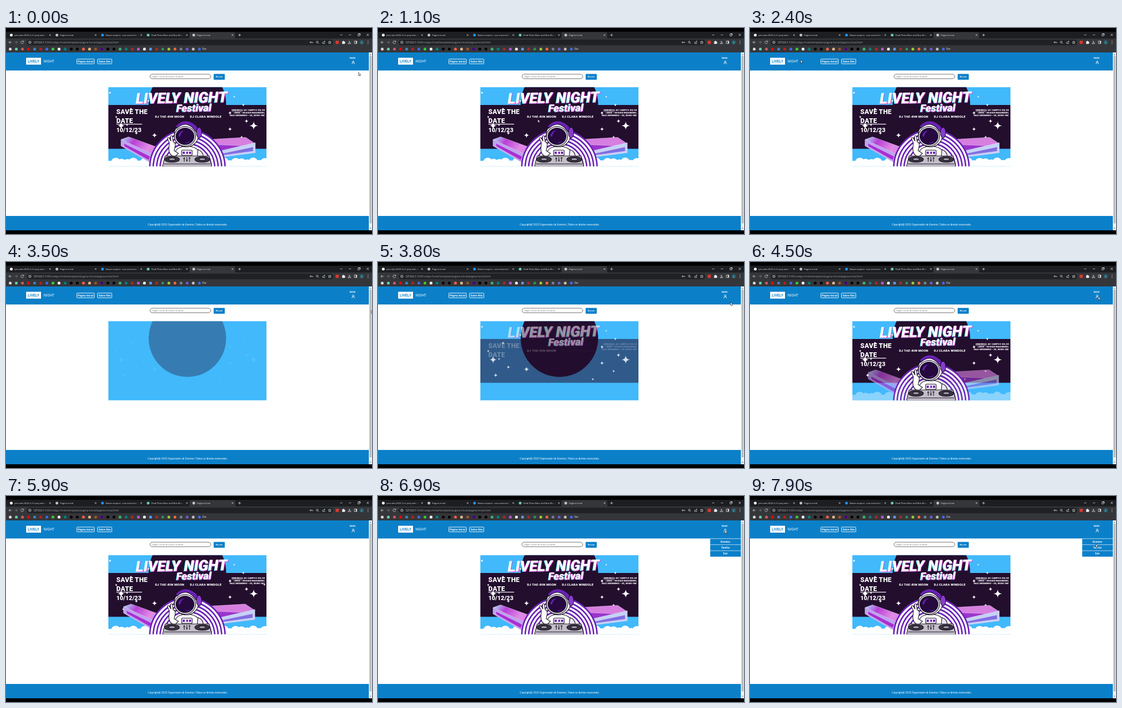
Recreate the animation shown at these times as an HTML page. Size 690 by 388 pixels, loop 8 s.

```html
<!DOCTYPE html>
<html lang="pt">
<head>
<meta charset="utf-8">
<title>Pagina inicial</title>
<style>
html, body { margin: 0; height: 100%; overflow: hidden; background: #000; }
svg { display: block; width: 100vw; height: 100vh; font-family: "Liberation Sans", Arial, sans-serif; }
.ui { font-family: "Open Sans", sans-serif; fill: #e8eaed; }
.b { font-weight: 700; fill: #fff; font-size: 4.65px; }
.m { text-anchor: middle; }
.fat { font-family: Roboto, sans-serif; font-weight: 900; fill: #fff; }
.i { font-style: italic; }
.ln { fill: none; stroke: #dcdee2; stroke-width: .8; }
.wl { fill: none; stroke: #fff; stroke-width: .9; }
.ink { stroke: #17101f; stroke-width: 1.1; }
</style>
</head>
<body>
<svg viewBox="0 0 690 388" preserveAspectRatio="none">
<defs>
  <clipPath id="frame"><rect x="193" y="111.5" width="298" height="149"/></clipPath>
  <linearGradient id="gem" x2="1" y2=".4">
    <stop offset="0" stop-color="#a8eaf7"/><stop offset=".3" stop-color="#b93fd6"/>
    <stop offset=".65" stop-color="#e08ae6"/><stop offset="1" stop-color="#d77be6"/>
  </linearGradient>
  <linearGradient id="fade"><stop offset=".86" stop-color="#e8eaed"/><stop offset="1" stop-color="#e8eaed" stop-opacity="0"/></linearGradient>
</defs>

<!-- browser -->
<rect y="7" width="690" height="13" fill="#1d1e21"/>
<path d="M344 20q2 0 2-2v-8q0-2 2-2h82q2 0 2 2v8q0 2 2 2z" fill="#35363a"/>
<rect y="19.7" width="690" height="26.5" fill="#35363a"/>
<rect x="39" y="22" width="578" height="10.4" rx="5.2" fill="#202124"/>
<g id="tabs" class="ui" font-size="4.15"></g>
<g class="ln">
  <path d="M437.7 13.3h5.2m-2.6-2.6v5.2M630 12l2 2 2-2M646.5 13h4M663.5 11.5h3.4v3.4h-3.4zm1-1h3.4v3.4M680 10.9l4 4m0-4l-4 4"/>
  <path d="M10.6 27H5.5m2.4-2.4L5.5 27l2.4 2.4"/>
  <path d="M16.5 27h5m-2.4-2.4l2.4 2.4-2.4 2.4" stroke="#85878b"/>
  <path d="M32.6 25.4a2.5 2.5 0 1 0 .5 2.2M33.3 23.9v2h-2"/>
  <circle cx="45" cy="27" r="2.3"/><path d="M45 26.5v1.7m0-2.8v.5"/>
  <circle cx="574.3" cy="27" r="1.2"/><path d="M575.5 27h3v1.3"/>
  <circle cx="586.7" cy="26.5" r="1.7"/><path d="M588 27.8l1.7 1.7"/>
  <path d="M597 26v3.2h4V27.5M598.5 27.2q.4-2 2.6-2m-1.1-1.1l1.3 1.1-1.3 1.2"/>
  <path d="M610.4 24.3l.8 1.8 2 .2-1.5 1.3.4 2-1.7-1-1.7 1 .4-2-1.5-1.3 2-.2z"/>
  <path d="M647.5 24v3.8m-1.8-1.7l1.8 1.8 1.8-1.8M645 28v1.5h5V28"/>
  <rect x="656.7" y="24.6" width="4.6" height="4.6"/><path d="M660.4 24.6v4.6" stroke-width="1.8"/>
</g>
<rect x="621.5" y="24" width="6" height="6" rx="1" fill="#d8392d"/>
<path d="M633.7 25.2h1.5q0-1.3 1-1.3t1 1.3h1.5v1.5q1.2 0 1.2 1t-1.2 1v1.2h-5z" fill="#e8eaed"/>
<circle cx="670.7" cy="27" r="3.7" fill="#2d6577"/>
<text class="ui m" x="670.7" y="28.5" font-size="4">J</text>
<path d="M682.5 24.4v.1m0 2.4v.1m0 2.4v.1" stroke="#e8eaed" stroke-width="1.2" stroke-linecap="round"/>
<text class="ui" x="51.5" y="28.7" font-size="4.82">127.0.0.1<tspan fill="#9aa0a6">:5500/codigo-fonte/templates/pagina-inicial/pagina-inicial.html</tspan></text>
<g id="marks"></g>
<text class="ui" x="370" y="41.4" font-size="4.4">Dev</text>

<!-- page -->
<rect y="46" width="690" height="335" fill="#fff"/>
<rect y="46" width="684" height="34" fill="#0b80c9"/>
<rect y="354" width="684" height="27" fill="#0b80c9"/>
<rect x="684" y="46" width="6" height="335" fill="#f1f1f1"/>
<rect x="685.3" y="52" width="3.8" height="316" fill="#bcbcbc"/>
<path d="M685.7 50.3l1.5-1.8 1.5 1.8zM685.7 376.5l1.5 1.8 1.5-1.8z" fill="#606060"/>
<rect x="38" y="56" width="28" height="13" fill="#fff"/>
<text class="m" x="52" y="64.7" font-size="6.4" font-weight="700" fill="#0b80c9">LIVELY</text>
<text class="m" x="81" y="64.7" font-size="6.4" fill="#fff">NIGHT</text>
<g class="wl"><rect x="133.5" y="58.5" width="33" height="9" rx=".8"/><rect x="172.5" y="58.5" width="27" height="9" rx=".8"/>
  <circle cx="654.6" cy="63.6" r="1.5"/><path d="M652.1 68.2q0-3 2.5-3t2.5 3"/></g>
<g class="m">
  <text class="b" x="150" y="64.7">Página Inicial</text>
  <text class="b" x="186" y="64.7">Sobre Nós</text>
  <text class="b" x="653.3" y="58">teste</text>
  <text x="342" y="372.4" font-size="4.62" fill="#fff">Copyright@ 2023 Organizador de Eventos | Todos os direitos reservados</text>
</g>
<rect x="271.5" y="87" width="114.5" height="8.6" rx="4.3" fill="#fff" stroke="#4a4a4a" stroke-width=".8"/>
<text x="276" y="92.6" font-size="3.85" fill="#6d6d6d">Digite o nome do evento ou tarefa</text>
<rect x="391.5" y="86.5" width="21" height="11" rx="1" fill="#0b80c9"/>
<text class="b m" x="402" y="93.4" style="font-size:3.8px">Buscar</text>

<!-- banner -->
<g clip-path="url(#frame)">
  <rect x="193" y="111" width="298" height="150" fill="#41b9fb"/>
  <circle id="disc" cx="342" cy="143.5" r="73" fill="#230e2e"/>
  <rect id="band" x="193" y="145" width="298" height="82.5" fill="#230e2e"/>
  <g id="stars" fill="#fff"></g>
  <g id="clouds" fill="#fff"></g>
  <g id="gems" stroke="#f3c9f7" stroke-width=".5">
    <g id="gemL">
      <path d="M217 210l14-5 72 26-8 20-24 2-54-31z" fill="url(#gem)"/>
      <path d="M217 210l60 28-6 15-54-31z" fill="#b9a4ef"/>
      <path d="M222 217l50 25-3 7-46-26z" fill="#a92fd0"/>
    </g>
    <g id="gemR">
      <path d="M364 211l88-5 18 12-86 22z" fill="#d67fdf"/>
      <path d="M364 211l20 29 70-18-76-3z" fill="#9a35cc"/>
      <path d="M384 236l86-20v19l-86 11z" fill="#c3d3f5"/>
      <path d="M386 241l80-17v8l-80 11z" fill="#7f6fe0"/>
    </g>
  </g>
  <g id="arcs" fill="#fff" stroke="#6a22b5" stroke-width="2.8"></g>
  <g id="dj">
    <path d="M318 240q0-17 23-17t25 17v8h-48z" fill="#fff" class="ink"/>
    <path d="M318 243q-11-3-11-15l1-12-4-8q1-3 4 0l3 5-1-9q2-3 4 1l1 9q5 2 4 8l-2 9 8 5z" fill="#fff" class="ink"/>
    <path d="M362 229q11 4 10 16h-12z" fill="#eee6f5" class="ink"/>
    <circle cx="340" cy="201" r="23" fill="#fff" class="ink"/>
    <path d="M320 184q18-18 39 0l5 9-6 3q-16-25-36-7z" fill="#6a22b5" class="ink"/>
    <ellipse cx="364" cy="197" rx="5" ry="10" fill="#8a3bd0" class="ink"/>
    <ellipse cx="337.5" cy="204" rx="20" ry="18.5" fill="#dcd4e4" class="ink"/>
    <ellipse cx="337.5" cy="204" rx="17" ry="15.5" fill="#25093f" class="ink"/>
    <path d="M325 203q2-9 11-10-7 4-8 12zM348 213q-5 5-11 4 7-2 11-4z" fill="#6a22b5"/>
    <rect x="331" y="230" width="20" height="10" rx="2" fill="#eee6f5" class="ink"/>
    <path d="M333 233h4v4h-4zm7 0h3v4h-3zm5 0h4v4h-4z" fill="#6a22b5"/>
    <path d="M300 241h83l5 20h-93z" fill="#c3bfc9" class="ink"/>
    <g id="decks" class="ink"></g>
    <path d="M336 243v9m5-9v9m5-9v9M334 246h4m1 3h4m1-4h4M298 256h87" class="ink" fill="none"/>
  </g>
  <g id="title" class="fat i" transform="rotate(-1 331 140)"></g>
  <g class="fat" font-size="12.4">
    <g id="save"><text x="208" y="162" letter-spacing=".25">SAVE THE</text></g>
    <g id="date"><text x="208" y="178.5" letter-spacing=".3">DATE</text></g>
    <g id="day"><path d="M208 181.2h48.5" stroke="#fff" stroke-width="1.2"/><text x="208" y="195.8" font-size="11.3">10/12/23</text></g>
  </g>
  <g class="fat m" font-size="6.1" letter-spacing=".2">
    <text id="dj1" x="308.5" y="169.3">DJ TAE-RIN MOON</text>
    <text id="dj2" x="376.5" y="169.3">DJ CLARA WINDOLE</text>
  </g>
  <g id="place" class="fat" font-size="4.1" text-anchor="end">
    <path d="M425 157h21" stroke="#fff" stroke-width=".5"/>
    <text x="488" y="156.2">ENDEREÇO: AV. CAMPO E SOL DE</text>
    <text x="488" y="161.3">LINHO – BOSQUE IMAGINÁRIO,</text>
    <text x="487.5" y="166.4">VALE SERENINHO – XX, 00000-000</text>
  </g>
</g>

<g id="menu" class="m">
  <rect x="626.3" y="80" width="57.7" height="34.3" fill="#0b80c9"/>
  <path d="M626.3 80.3h57.7m-57.7 11.4h57.7m-57.7 11.4h57.7" stroke="#fff" stroke-width=".7"/>
  <text class="b" x="655" y="87.5">Eventos</text>
  <text class="b" x="655" y="99">Tarefas</text>
  <text class="b" x="655" y="110.4">Sair</text>
</g>
<path id="cursor" d="M0 0v6l1.4-1.3 1 2.2.9-.4-1-2.1h2z" fill="#fff" stroke="#111" stroke-width=".6"/>
</svg>
<script>
const $ = id => document.getElementById(id);
const clamp = v => Math.max(0, Math.min(1, v));
const fill = (id, list, draw) => $(id).innerHTML = list.map(draw).join('');
const range = n => [...Array(n).keys()];

fill('tabs', [
  ['white', 'pmv-ads-2023-2-e1-proj-web-m'],
  ['silver', 'Pagina inicial'],
  ['dodgerblue', 'Baixar arquivo - sua conversão f'],
  ['mediumaquamarine', 'Draft Plans Base and Non-Base'],
  ['silver', 'Pagina inicial']
], ([color, name], i) => {
  const x = 10 + 86 * i;
  return `<circle cx="${x}" cy="13.3" r="2.6" fill="${color}"/>
    <text x="${x + 6}" y="14.8" ${name.length > 20 ? 'fill="url(#fade)"' : ''}>${name}</text>
    <path class="ln" d="M${x + 71.6} 11.9l2.8 2.8m0-2.8l-2.8 2.8"/>`;
});

const markColors = ('gainsboro mediumaquamarine indianred red steelblue firebrick royalblue limegreen white teal black black ' +
  'tomato burlywood sienna indigo black black mediumseagreen teal brown mediumorchid white cornflowerblue ' +
  'brown seagreen yellowgreen tomato slategray slateblue silver royalblue').split(' ');
fill('marks', markColors, (color, i) =>
  `<rect x="${5.5 + 11.5 * i}" y="37.3" width="5" height="5" rx="1.6" fill="${color}"/>`);

// Four-pointed stars: three large ones, the rest scattered over the band
let seed = 11;
const random = () => (seed = seed * 16807 % 2147483647) / 2147483647;
const small = range(14).map(i => [(i % 2 ? 404 : 196) + random() * 84, 122 + i * 7.6, 2 + random() * 2.5]);
fill('stars', [[217, 184, 7], [467, 184, 8], [280, 202, 5], ...small], ([x, y, r]) =>
  `<path transform="translate(${x} ${y}) scale(${r})" d="M0-1Q.06-.06 1 0Q.06.06 0 1Q-.06.06-1 0Q-.06-.06 0-1"/>`);

fill('clouds', range(16), i => {
  const k = i >> 1, x = 196 + 11 * k;
  return `<circle cx="${i % 2 ? 684 - x : x}" cy="${259 - 6 * Math.abs(Math.sin(k * 1.9 + i % 2))}" r="9"/>`;
});

fill('arcs', range(5), i => `<circle cx="342" cy="263" r="${71 - 6.5 * i}"/>`);

fill('decks', [313, 370], x => `<ellipse cx="${x}" cy="247.5" rx="14" ry="5.5" fill="#3a3342"/>
  <ellipse cx="${x}" cy="247" rx="6" ry="2.4" fill="#aaa4b2"/>`);

fill('title', [['#35e6ee', -1], ['#e23bd0', 1], ['#fff', 0]], ([color, d]) =>
  `<g transform="translate(${d} ${Math.abs(d)})" fill="${color}" text-anchor="middle">
  <text x="331" y="141" font-size="28">LIVELY NIGHT</text><text x="354" y="157.5" font-size="19.3">Festival</text></g>`);

// Banner layers fade in one group after another
const replay = 3350, step = 110, fadeTime = 420;
const groups = ['disc', 'stars', 'band title', 'save date dj1 place', 'dj2', 'dj', 'day', 'arcs', 'gems', 'clouds'];

// Pointer: time, x, y
const path = [[0, 664.5, 83.5], [900, 411, 228], [1500, 82, 60], [2100, 95, 60], [2800, 96, 60], [3500, 688.5, 91],
  [3600, 665, 88], [4000, 664, 63.5], [4500, 657, 65.5], [5400, 480, 180], [5900, 485.5, 163], [6300, 624, 93],
  [6700, 654, 64], [7200, 654, 66], [7400, 654, 96], [7700, 648, 92], [8000, 654, 90]];

function pointer(t) {
  const i = path.findIndex(p => p[0] > t);
  const [t0, x0, y0] = path[i - 1], [t1, x1, y1] = path[i];
  const k = (t - t0) / (t1 - t0);
  return [x0 + (x1 - x0) * k, y0 + (y1 - y0) * k];
}

function draw(now) {
  const t = Math.floor(now % 8000 / 100) * 100;
  groups.forEach((names, i) => {
    const alpha = t < replay ? 1 : clamp((t - replay - i * step) / fadeTime);
    names.split(' ').forEach(id => $(id).setAttribute('opacity', alpha));
  });
  const drift = t < replay ? 0 : 1 - clamp((t - 5800) / 500);
  $('gemL').setAttribute('transform', `translate(${6 * drift} ${-2 * drift})`);
  $('gemR').setAttribute('transform', `translate(${-drift} ${-3 * drift})`);
  $('menu').setAttribute('visibility', t >= 6900 ? 'visible' : 'hidden');
  $('cursor').setAttribute('transform', `translate(${pointer(t)})`);
  requestAnimationFrame(draw);
}
draw(0);
</script>
</body>
</html>
```
